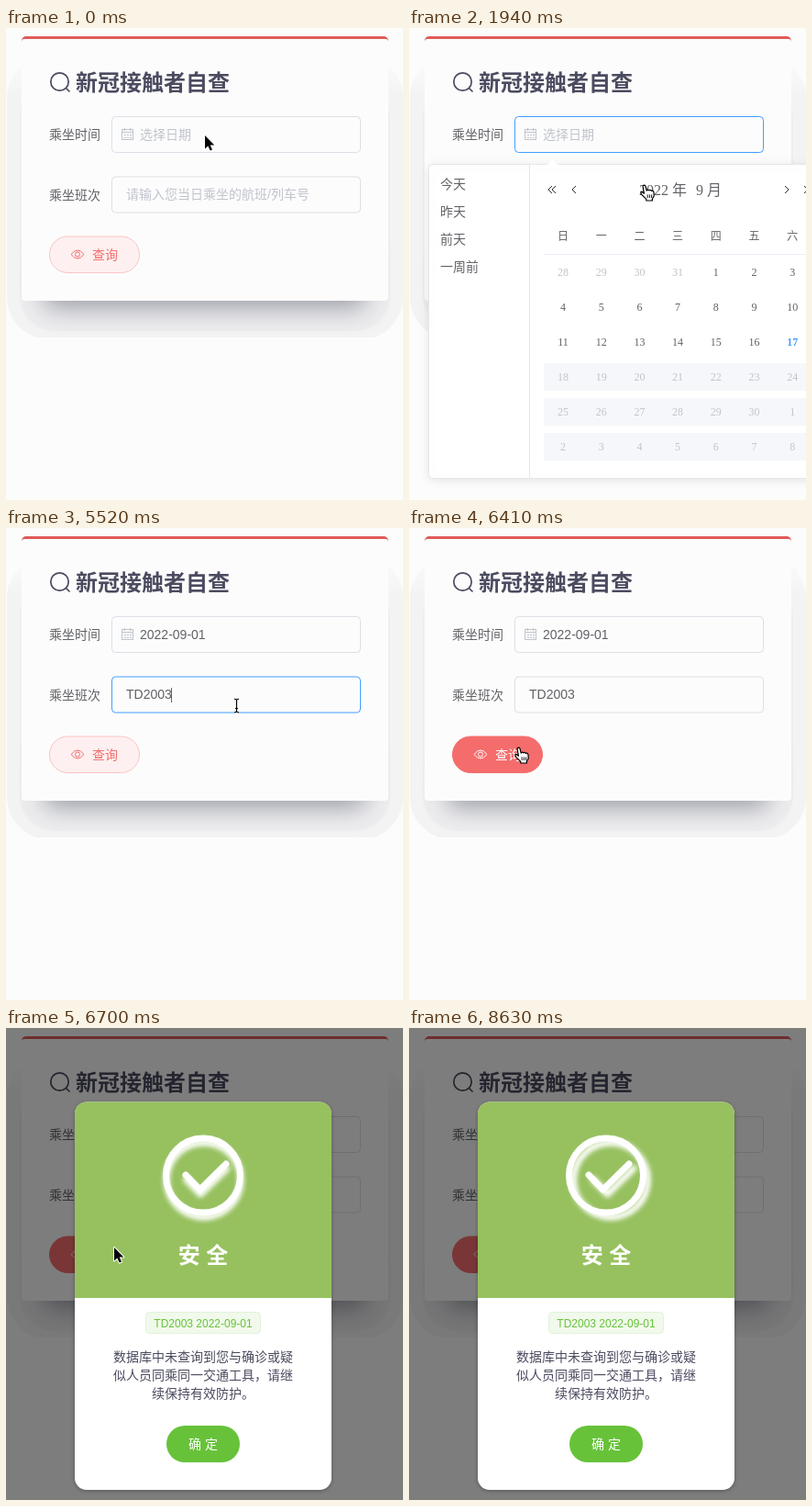
Write an HTML page with a canvas that moves like this. It is 433 by 514 pixels and loops after 8650 ms.

```html
<!DOCTYPE html>
<html lang="zh">
<head>
<meta charset="utf-8">
<style>
html, body { margin: 0; width: 433px; height: 514px; overflow: hidden; background: #fcfcfc; }
canvas { display: block; }
</style>
</head>
<body>
<canvas id="stage" width="433" height="514"></canvas>
<script>
const W = 433, H = 514, LOOP = 8650;
const SANS = '"Liberation Sans", "Noto Sans CJK SC", "Noto Sans CJK", sans-serif';
const SERIF = '"Liberation Serif", "Noto Sans CJK SC", "Noto Sans CJK", serif';
const INK = '#4b4b60', TEXT = '#606266', DIM = '#c0c4cc', LINE = '#dcdfe6';
const BLUE = '#409eff', RED = '#f56c6c', GREEN = '#67c23a', PAGE = '#fcfcfc';

// The picture holds still between these moments: [start, end, steps]
const RUNS = [[0, 0, 1], [1350, 2390, 8], [2540, 3420, 7], [3870, 3870, 1], [4170, 4620, 4],
  [5070, 5220, 2], [5520, 5520, 1], [5970, 7000, 8], [7150, 7150, 1], [7450, 8480, 8], [8630, 8630, 1]];
const TICKS = RUNS.flatMap(([a, b, n]) =>
  Array.from({ length: n }, (_, i) => n > 1 ? Math.floor((a + (b - a) * i / (n - 1)) / 10) * 10 : a));

const PATH = [[0, 217, 117], [1350, 217, 117], [1940, 255, 171], [2390, 333, 264], [2690, 333, 264],
  [3270, 251, 193], [5820, 251, 193], [6270, 118, 239], [7300, 118, 239], [8480, 410, 530]];
const TYPED = [[4170, 'T'], [4320, 'TD'], [5070, 'TD20'], [5220, 'TD200'], [5520, 'TD2003']];

const stage = document.getElementById('stage').getContext('2d');
const layer = document.createElement('canvas');
layer.width = W;
layer.height = H;
const sheet = layer.getContext('2d');
let g = stage;

const ramp = (t, a, d) => Math.min(1, Math.max(0, (t - a) / d));
const smooth = p => p * p * (3 - 2 * p);

function box(x, y, w, h, r, fill, stroke) {
  g.beginPath();
  g.roundRect(x, y, w, h, r);
  if (fill) { g.fillStyle = fill; g.fill(); }
  if (stroke) { g.strokeStyle = stroke; g.lineWidth = 1; g.stroke(); }
}

function text(s, x, y, size, color, align = 'left', family = SANS, weight = 'normal') {
  g.font = `${weight} ${size}px ${family}`;
  g.textAlign = align;
  g.fillStyle = color;
  g.fillText(s, x, y);
}

function lines(color, width, ...polys) {
  g.beginPath();
  for (const p of polys)
    for (let i = 0; i < p.length; i += 2) i ? g.lineTo(p[i], p[i + 1]) : g.moveTo(p[0], p[1]);
  g.strokeStyle = color;
  g.lineWidth = width;
  g.stroke();
}

function ring(x, y, r, color, width) {
  g.beginPath();
  g.arc(x, y, r, 0, Math.PI * 2);
  g.strokeStyle = color;
  g.lineWidth = width;
  g.stroke();
}

function shadow(color, blur, x, y) {
  g.shadowColor = color;
  g.shadowBlur = blur;
  g.shadowOffsetX = x;
  g.shadowOffsetY = y;
}

// Draws a group apart, then lays it over the stage as one piece
function group(alpha, dy, scaleY, originY, draw) {
  sheet.clearRect(0, 0, W, H);
  g = sheet;
  draw();
  g = stage;
  g.save();
  g.globalAlpha = alpha;
  g.translate(0, originY + dy);
  g.scale(1, scaleY);
  g.drawImage(layer, 0, -originY);
  g.restore();
}

function card() {
  g.save();
  g.beginPath();
  g.rect(0, 0, W, 337);
  g.clip();
  box(1, 30, 432, 309, 46, '#f3f3f3');
  box(15, 60, 404, 270, 38, '#eeeef0');
  shadow('rgba(50,55,75,.46)', 28, 1000, 0);
  box(42 - 1000, 240, 350, 64, 8, '#000');
  g.restore();
  const fade = g.createLinearGradient(0, 28, 0, 75);
  fade.addColorStop(0, PAGE);
  fade.addColorStop(1, 'rgba(252,252,252,0)');
  g.fillStyle = fade;
  g.fillRect(0, 28, W, 47);
  box(17, 9, 400, 30, 5, '#de5b58');
  box(17, 12, 400, 285, [3, 3, 4, 4], PAGE);
}

function calendarIcon() {
  g.strokeStyle = DIM;
  g.lineWidth = 1;
  g.strokeRect(126.5, 110.5, 12, 11);
  lines(DIM, 1, [126, 113.5, 139, 113.5], [129.5, 109, 129.5, 112], [135.5, 109, 135.5, 112],
    [129, 116.5, 131, 116.5], [132, 116.5, 134, 116.5], [135, 116.5, 137, 116.5],
    [129, 119.5, 131, 119.5], [132, 119.5, 134, 119.5], [135, 119.5, 137, 119.5]);
}

function queryButton(hover) {
  const color = hover ? '#fff' : RED;
  box(47.5, 227, 98, 39.5, 19.75, hover ? RED : '#fef0f0', hover ? RED : '#fbc4c4');
  g.beginPath();
  g.moveTo(71, 246.5);
  g.quadraticCurveTo(78, 237.5, 85, 246.5);
  g.quadraticCurveTo(78, 255.5, 71, 246.5);
  g.strokeStyle = color;
  g.lineWidth = 1;
  g.stroke();
  ring(78, 246.5, 2.5, color, 1);
  text('查询', 94, 252, 14, color);
}

function form(t, hover) {
  lines(INK, 1.7, [65.5, 65.5, 69.5, 69.5]);
  ring(58.5, 58.5, 9.7, INK, 1.7);
  text('新冠接触者自查', 76, 68, 24, INK, 'left', SANS, 'bold');

  text('乘坐时间', 47, 121, 14, TEXT);
  box(115.5, 96.5, 271, 39, 4, PAGE, t >= 1350 && t < 2690 ? BLUE : LINE);
  calendarIcon();
  if (t < 2690) text('选择日期', 146, 121, 14, DIM);
  else text('2022-09-01', 146, 120.5, 14, TEXT);

  const focus = t >= 3420 && t < 6400;
  text('乘坐班次', 47, 186.5, 14, TEXT);
  box(115.5, 162, 271, 39, 4, PAGE, focus ? BLUE : t >= 3120 && t < 3420 ? DIM : LINE);
  const typed = TYPED.reduce((s, [at, v]) => t >= at ? v : s, '');
  if (typed) text(typed, 131, 186, 14, TEXT);
  else text('请输入您当日乘坐的航班/列车号', 131, 186, 14, DIM);
  if (t >= 3270 && t < 5970 && !(t >= 3870 && t < 4170)) {
    g.font = `14px ${SANS}`;
    g.fillStyle = TEXT;
    g.fillRect(Math.floor(131 + g.measureText(typed).width), 174, 1, 16);
  }
  queryButton(hover);
}

function picker() {
  shadow('rgba(0,0,0,.1)', 12, 0, 2);
  box(21.5, 148.5, 460, 342, 4, '#fff', '#e4e7ed');
  shadow('transparent', 0, 0, 0);
  g.beginPath();
  g.moveTo(150, 149.5);
  g.lineTo(156.5, 143.5);
  g.lineTo(163, 149.5);
  g.fillStyle = '#fff';
  g.fill();
  lines('#e4e7ed', 1, [131.5, 149, 131.5, 490]);
  ['今天', '昨天', '前天', '一周前'].forEach((s, i) => text(s, 34, 175 + i * 30, 14, TEXT));

  const chevron = (x, d) => lines('#303133', 1, [x + 2 * d, 172, x - 2 * d, 176, x + 2 * d, 180]);
  chevron(154, 1);
  chevron(158, 1);
  chevron(180, 1);
  chevron(412, -1);
  chevron(433, -1);
  text('2022 年', 251, 182, 16, TEXT, 'left', SERIF);
  text('9 月', 313, 182, 16, TEXT, 'left', SERIF);

  const colX = c => 168 + c * 41.7;
  [...'日一二三四五六'].forEach((s, c) => text(s, colX(c), 231, 12, TEXT, 'center', SERIF));
  lines('#ebeef5', 1, [147, 246.5, W, 246.5]);
  for (let i = 0; i < 42; i++) {
    const c = i % 7, row = (i - c) / 7, n = i - 3;
    const day = n < 1 ? n + 31 : n > 30 ? n - 30 : n;
    const y = 266 + row * 38;
    if (!c && row > 2) {
      g.fillStyle = '#f5f7fa';
      g.fillRect(147, y - 15, W - 147, 30);
    }
    const today = n === 17;
    text(day, colX(c), y + 4, 12, today ? BLUE : n < 1 || n > 17 ? DIM : TEXT,
      'center', SERIF, today ? 'bold' : 'normal');
  }
}

function popup(t) {
  shadow('rgba(0,0,0,.3)', 4, 0, 1);
  box(75, 80.5, 280, 422.5, 13, '#fff');
  shadow('transparent', 0, 0, 0);
  box(75, 80.5, 280, 213.5, [13, 13, 0, 0], '#97c15f');

  // The white glow sways from side to side below the badge
  g.save();
  g.lineCap = g.lineJoin = 'round';
  shadow('#fff', 5, 5 * Math.cos(Math.PI * (t - 6150) / 1200), 5);
  g.beginPath();
  g.arc(215, 160.5, 40.5, 0, Math.PI * 2);
  g.moveTo(196, 160);
  g.lineTo(211.5, 176);
  g.lineTo(240, 148);
  g.strokeStyle = '#fff';
  g.lineWidth = 7;
  g.stroke();
  g.restore();

  text('安 全', 215, 256, 24, '#fff', 'center', SANS, 'bold');
  box(152.5, 309.5, 125, 23, 4, '#f0f9eb', '#e1f3d8');
  text('TD2003 2022-09-01', 215, 325.5, 12, GREEN, 'center');
  ['数据库中未查询到您与确诊或疑', '似人员同乘同一交通工具，请继', '续保持有效防护。']
    .forEach((s, i) => text(s, 215, 363 + i * 20, 14, INK, 'center'));
  box(175, 433, 80, 40, 20, GREEN);
  text('确 定', 215, 458, 14, '#fff', 'center');
}

function place(t) {
  const i = PATH.findIndex(p => p[0] > t);
  if (i < 0) return PATH[PATH.length - 1].slice(1);
  const [a, x, y] = PATH[i - 1], [b, u, v] = PATH[i];
  const p = smooth((t - a) / (b - a));
  return [x + (u - x) * p, y + (v - y) * p];
}

const ARROW = new Path2D('M0 0V14.5L3.3 11.4L5.7 16.6L8 15.6L5.7 10.5H10.3Z');
const HAND = new Path2D('M0 1.2Q1.5-1 3 1.2L4.2 6.2Q5.2 4.2 6.8 5.9Q8.2 4.6 9.4 6.4' +
  'Q11.6 5.6 12 8L12.2 12L10.4 15V17H3.8V15.4L-.8 10.8Q-3.4 7.4-1.2 7.2L1.4 9.2Z');
const FINGERS = new Path2D('M5.2 10.4V14M7.4 10.4V14M9.6 10.4V14');

function pointer(shape, x, y) {
  g.save();
  g.translate(Math.round(x), Math.round(y));
  g.lineJoin = 'round';
  if (shape === 'beam') {
    const bar = [0.5, -6, 0.5, 7], top = [-2, -7, 0.5, -6, 3, -7], end = [-2, 8, 0.5, 7, 3, 8];
    lines('rgba(255,255,255,.8)', 3, bar, top, end);
    lines('#000', 1.2, bar, top, end, [-1, 3.5, 2, 3.5]);
  } else if (shape === 'hand') {
    g.fillStyle = '#fff';
    g.fill(HAND);
    g.strokeStyle = '#000';
    g.lineWidth = 1.2;
    g.stroke(HAND);
    g.lineWidth = 0.9;
    g.stroke(FINGERS);
  } else {
    g.strokeStyle = '#fff';
    g.lineWidth = 2;
    g.stroke(ARROW);
    g.fillStyle = '#000';
    g.fill(ARROW);
  }
  g.restore();
}

function render(t) {
  const [x, y] = place(t);
  const onButton = t > 5970 && x < 146 && y > 226;
  g.fillStyle = PAGE;
  g.fillRect(0, 0, W, H);
  card();
  form(t, onButton || t >= 6400);

  const open = smooth(ramp(t, 1350, 300)) * (1 - smooth(ramp(t, 2690, 300)));
  if (open) group(open, 0, open, 149, picker);

  const shade = ramp(t, 6500, 150), show = ramp(t, 6515, 180);
  if (shade) {
    g.fillStyle = `rgba(0,0,0,${shade / 2})`;
    g.fillRect(0, 0, W, H);
  }
  if (show) group(show, -20 * (1 - show), 1, 0, () => popup(t));

  const hand = (t >= 1900 && t < 2750) || (onButton && t < 6500);
  const beam = t >= 3120 && t < 6100 && y < 202;
  if (t < 8480) pointer(hand ? 'hand' : beam ? 'beam' : 'arrow', x, y);
}

const start = performance.now();
let last = -1;
function loop() {
  const now = (performance.now() - start) % LOOP;
  const t = TICKS.reduce((s, v) => v <= now ? v : s, 0);
  if (t !== last) render(last = t);
  requestAnimationFrame(loop);
}
loop();
</script>
</body>
</html>
```
